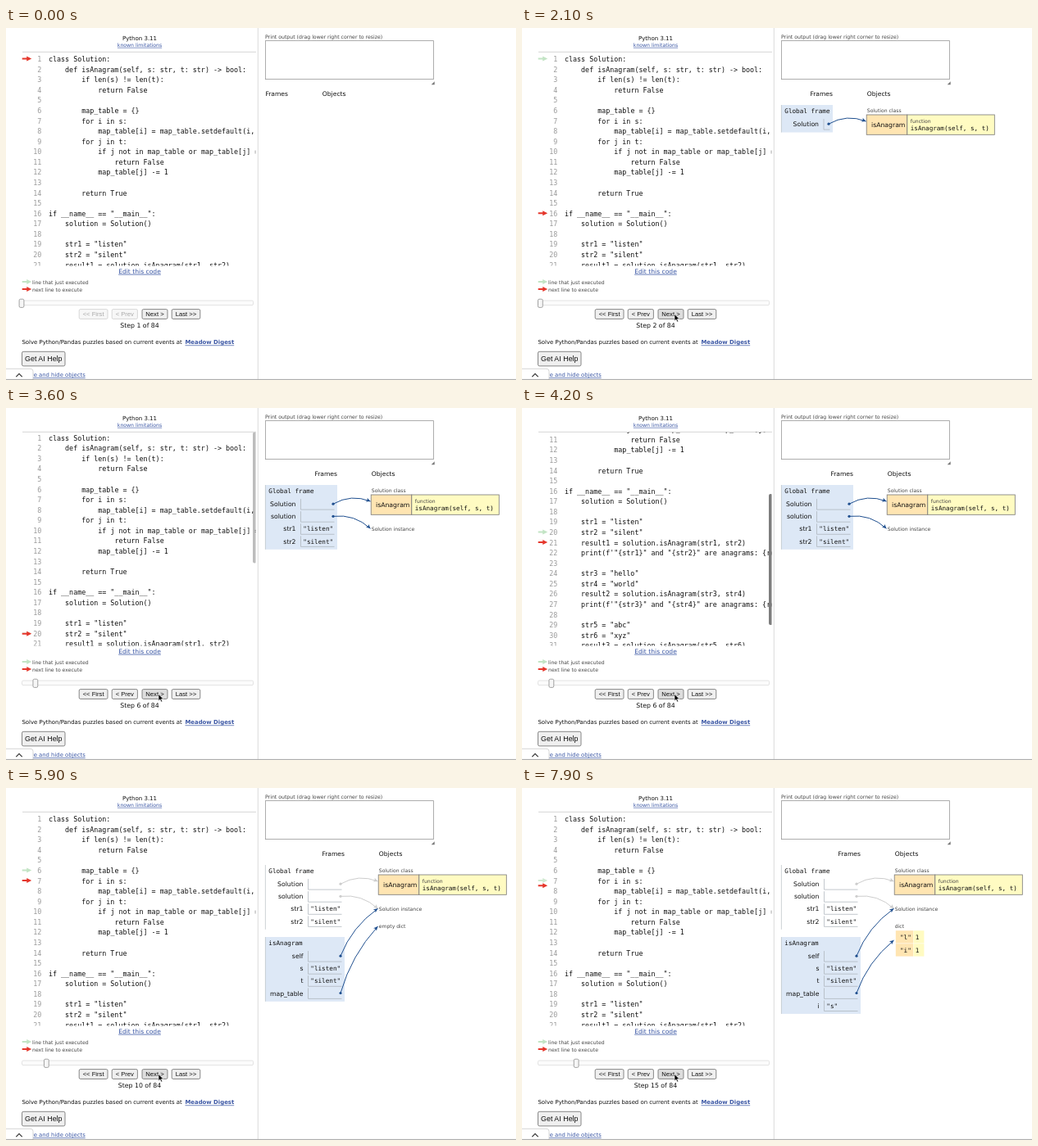
These frames come from a looping animation (622x430 px, 8 s). An HTML page:

```html
<!DOCTYPE html>
<html lang="en">
<head>
<meta charset="utf-8">
<title>Step through isAnagram</title>
<style>
  html, body { margin: 0; width: 100%; height: 100%; overflow: hidden; background: #fff; }
  svg { display: block; width: 622px; height: 430px; }
  text { font-family: "DejaVu Sans", sans-serif; fill: #111; white-space: pre; }
  .mono { font-family: "DejaVu Sans Mono", monospace; }
  .ui { font-family: "Liberation Sans", sans-serif; }
  .num { fill: #999; }
  .small { fill: #444; }
  .link { fill: #3a56a4; text-decoration: underline; }
  .bold { font-weight: bold; }
  .off { fill: #a9a9a9; }
</style>
</head>
<body>
<svg id="stage" viewBox="0 0 622 430">
  <defs>
    <clipPath id="view"><rect x="16" y="29" width="288.5" height="261.5"/></clipPath>
    <path id="arrow" d="M0-1H5.5V-3L11.5 0L5.5 3V1H0Z"/>
  </defs>
  <g id="page"></g>
  <g clip-path="url(#view)">
    <g id="code"></g>
    <rect id="thumb" x="301" width="4.4" height="160" rx="2" fill="#7d7d7d"/>
  </g>
  <path d="M20 29.3H305" stroke="#ccc" stroke-width=".8"/>
  <g id="controls"></g>
  <g id="heap"></g>
  <path id="mouse" d="M0 0V8.2L1.9 6.5L3.2 9.5L4.6 8.9L3.3 6H5.9Z" fill="#000" stroke="#fff" stroke-width=".6"/>
</svg>
<script>
const $ = id => document.getElementById(id);
const LOOP = 8000, GLIDE = 400, PITCH = 12.57, SCROLL = 125;
const RED = '#e5372c', GREEN = '#c3e4c5', BLUE = '#1f4f8f', PALE = '#cdcdcd';

// start time, line just executed, next line
const steps = [
  [0, 0, 1], [1500, 1, 16], [2150, 16, 17], [2700, 17, 19], [3100, 19, 20],
  [3500, 20, 21], [4300, 21, 2], [4700, 2, 3], [5100, 3, 6], [5500, 6, 7],
  [6000, 7, 8], [6400, 8, 7], [6850, 7, 8], [7300, 8, 7], [7700, 7, 8]
];

const trial = (n, a, b) => `
    str${2 * n - 1} = "${a}"
    str${2 * n} = "${b}"
    result${n} = solution.isAnagram(str${2 * n - 1}, str${2 * n})
    print(f'"{str${2 * n - 1}}" and "{str${2 * n}}" are anagrams: {result${n}}')
`;
const source = `class Solution:
    def isAnagram(self, s: str, t: str) -> bool:
        if len(s) != len(t):
            return False

        map_table = {}
        for i in s:
            map_table[i] = map_table.setdefault(i, 0) + 1
        for j in t:
            if j not in map_table or map_table[j] == 0:
                return False
            map_table[j] -= 1

        return True

if __name__ == "__main__":
    solution = Solution()
` + trial(1, 'listen', 'silent') + trial(2, 'hello', 'world') + trial(3, 'abc', 'xyz');

const clamp = v => Math.min(1, Math.max(0, v));
const cubic = p => p < .5 ? 4 * p ** 3 : 1 - 4 * (1 - p) ** 3;
const swing = p => .5 - Math.cos(p * Math.PI) / 2;
const span = (t, from, len) => clamp((t - from) / len);
const lineY = n => 37.6 + PITCH * (n - 1);

const esc = s => s.replace(/&/g, '&amp;').replace(/</g, '&lt;');
// y is the optical middle of the text
const text = (x, y, s, size, cls = '', anchor = 'start') =>
  `<text x="${x}" y="${y + size * .36}" font-size="${size}" class="${cls}" text-anchor="${anchor}">${esc(s)}</text>`;
const rect = (x, y, w, h, fill, stroke = 'none', r = 0) =>
  `<rect x="${x}" y="${y}" width="${w}" height="${h}" fill="${fill}" stroke="${stroke}" stroke-width=".8" rx="${r}"/>`;
const path = (d, stroke, w = .8, fill = 'none') =>
  `<path d="${d}" stroke="${stroke}" stroke-width="${w}" fill="${fill}"/>`;
const marker = (y, fill, id = '') =>
  `<use href="#arrow" ${id && `id="${id}"`} transform="translate(19.7 ${y})" fill="${fill}"/>`;

function drawPage() {
  $('page').innerHTML =
    text(163, 12.5, 'Python 3.11', 7, '', 'middle') +
    text(163, 20.6, 'known limitations', 6.15, 'link', 'middle') +
    text(163, 297, 'Edit this code', 7.6, 'link', 'middle') +
    marker(310, GREEN) + text(32, 310.3, 'line that just executed', 6.13, 'small') +
    marker(319, RED) + text(32, 319.5, 'next line to execute', 6.13, 'small') +
    text(19.5, 384, 'Solve Python/Pandas puzzles based on current events at', 6.9) +
    text(218.5, 384, 'Meadow Digest', 6.9, 'link bold') +
    rect(19.5, 395.3, 52.5, 17.6, '#efefef', '#6b6b6b', 1.8) +
    text(45.8, 404.2, 'Get AI Help', 8.9, 'ui', 'middle') +
    text(19.5, 423.5, 'Move and hide objects', 6.85, 'link') +
    path('M-1 416.3H30Q33 416.3 33 419.5V431H-1Z', '#ccc', .8, '#fff') +
    path('M12.3 426.2L16 422.4L19.7 426.2', '#333', 1.1) +
    path('M307.3 0V429', '#d2d2d2') + path('M0 429.4H622', '#8c8c8c') +
    text(316, 10.6, 'Print output (drag lower right corner to resize)', 6.2, 'small') +
    rect(316.4, 15.6, 205, 47, '#fff', '#999') +
    path('M522.7 65.3V69.3H518.7Z', 'none', 0, '#777');
}

function drawCode() {
  $('code').innerHTML = source.split('\n').map((line, i) => {
    const body = line.trimStart(), y = lineY(i + 1) + .6;
    return text(43.2, y, `${i + 1}`, 8.35, 'mono num', 'end') +
      text(52 + 5.027 * (line.length - body.length), y, body, 8.35, 'mono');
  }).join('') + marker(0, GREEN, 'prev') + marker(0, RED, 'next');
}

function button(x, w, label, on, hover) {
  const fill = hover ? '#dedede' : on ? '#efefef' : '#f7f7f7';
  return rect(x, 343.6, w, 11.8, fill, on ? '#6b6b6b' : '#cfcfcf', 1.6) +
    text(x + w / 2, 349.4, label, 7.65, on ? 'ui' : 'ui off', 'middle');
}

function drawControls(n, hover) {
  $('controls').innerHTML =
    rect(19.5, 333, 282, 5.6, '#fbfbfb', '#dcdcdc', 1.5) +
    rect(16.1 + 3.37 * (n - 1), 331.2, 5.8, 10.2, '#f6f6f6', '#8f8f8f', 1.6) +
    button(89.2, 34.8, '<< First', n > 1) + button(129.2, 31.2, '< Prev', n > 1) +
    button(166, 31, 'Next >', true, hover) + button(202.2, 34.6, 'Last >>', true) +
    text(163, 363.5, `Step ${n} of 84`, 7.8, '', 'middle');
}

// curved pointer bulging to the left of its direction
function pointer(x1, y1, x2, y2, color) {
  const len = Math.hypot(x2 - x1, y2 - y1);
  const cx = (x1 + x2) / 2 + (y2 - y1) / len * 11, cy = (y1 + y2) / 2 - (x2 - x1) / len * 11;
  const turn = Math.atan2(y2 - cy, x2 - cx) * 180 / Math.PI;
  return path(`M${x1} ${y1}Q${cx} ${cy} ${x2} ${y2}`, color, 1) +
    `<circle cx="${x1}" cy="${y1}" r="1.6" fill="${color}"/>` +
    `<path d="M0 0L-5.2-2.5L-4-0L-5.2 2.5Z" fill="${color}" transform="translate(${x2} ${y2}) rotate(${turn})"/>`;
}

// vars: [name, string value or pointer target y]
function frame(top, title, vars, right, cell, active) {
  const row = i => top + 23.5 + 15.1 * i, bottom = row(vars.length - 1) + 10;
  const left = right - 3.5 - cell, pointers = [];
  let out = active ? rect(316, top, right - 316, bottom - top, '#dde8f6') : '';
  out += path(`M316.4 ${top}V${bottom}`, '#c2c8cc') + text(320.3, top + 7.2, title, 7.65, 'mono');
  vars.forEach(([name, value], i) => {
    const y = row(i);
    out += text(left - 6, y, name, 7.73, '', 'end') +
      path(`M${left} ${y - 6.4}V${y + 6.6}H${right - 3.5}`, '#a9b0b8', .7);
    if (typeof value === 'string') out += text(left + 2.8, y, `"${value}"`, 7.65, 'mono');
    else pointers.push([right - 5, y - .3, right + 40.5, value, active ? BLUE : PALE]);
  });
  return [out, pointers];
}

function drawHeap(n) {
  const right = n < 2 ? 344 : n < 5 ? 379 : n < 10 ? 404 : 413;
  const x = right + 41.8, cell = n < 5 ? 7.5 : 41;
  const inCall = n > 6, dictY = n > 11 ? 186 : 169;
  let out = text(right, 80.3, 'Frames', 7.6, '', 'end') + text(x, 80.3, 'Objects', 7.6);
  if (n > 1) {
    const globals = [['Solution', 114], ['solution', 147.3], ['str1', 'listen'], ['str2', 'silent']];
    const count = n < 4 ? 1 : n < 5 ? 2 : n < 6 ? 3 : 4;
    const parts = [frame(94, 'Global frame', globals.slice(0, count), right, cell, !inCall)];
    if (inCall) {
      const locals = [['self', 147.3], ['s', 'listen'], ['t', 'silent']];
      if (n > 9) locals.push(['map_table', dictY]);
      if (n > 10) locals.push(['i', 'lis'[n - 11 >> 1]]);
      parts.push(frame(182, 'isAnagram', locals, right, cell, true));
    }
    out += parts.map(p => p[0]).join('') +
      text(x, 101.2, 'Solution class', 6.08, 'small') +
      rect(x - .6, 106, 49.6, 24.3, '#ffe5b2', '#777') +
      rect(x + 49, 106, 106.5, 24.3, '#fffbc2', '#777') +
      text(x + 5.2, 118.2, 'isAnagram', 7.73) +
      text(x + 53, 113.7, 'function', 6.08, 'small') +
      text(x + 53, 122.6, 'isAnagram(self, s, t)', 7.6, 'mono');
    if (n > 3) out += text(x, 147.5, 'Solution instance', 6.08, 'small');
    if (n > 9) out += text(x, 168.8, n > 11 ? 'dict' : 'empty dict', 6.08, 'small');
    if (n > 11) ['l', 'i'].slice(0, n > 13 ? 2 : 1).forEach((key, i) => {
      const y = 174.2 + 16 * i;
      out += rect(x + 1, y, 21.3, 15.4, '#ffe5b2') + rect(x + 22.6, y, 13, 15.4, '#fffbc2') +
        text(x + 6.2, y + 8, `"${key}"`, 7.65, 'mono') + text(x + 25, y + 8, '1', 7.65);
    });
    out += parts.flatMap(p => p[1]).map(p => pointer(...p)).join('');
  }
  $('heap').innerHTML = out;
}

let shown = '';
function render(t) {
  let n = steps.length;
  while (steps[n - 1][0] > t) n--;
  const hover = t >= 1050, key = n + '/' + hover;
  if (key !== shown) {
    shown = key;
    drawControls(n, hover);
    drawHeap(n);
  }

  const [start, done, next] = steps[n - 1];
  const from = lineY(n > 1 ? steps[n - 2][2] : next);
  const y = from + (lineY(next) - from) * cubic(span(t, start, GLIDE));
  $('next').setAttribute('transform', `translate(19.7 ${y})`);
  $('prev').setAttribute('transform', `translate(19.7 ${lineY(done || 1)})`);
  $('prev').setAttribute('opacity', done ? span(t, start, 250) : 0);

  const scroll = SCROLL * (swing(span(t, 3570, 430)) - swing(span(t, 4290, 300)));
  $('code').setAttribute('transform', `translate(0 ${-scroll})`);
  $('thumb').setAttribute('y', 28.5 + scroll * .612);
  $('thumb').setAttribute('opacity', span(t, 3570, 60) - span(t, 5000, 250));

  const p = 1 - (1 - span(t, 480, 620)) ** 2;
  $('mouse').setAttribute('transform', `translate(${256 - 70 * p} ${318 + 31.5 * p})`);
  $('mouse').setAttribute('opacity', t < 500 ? 0 : 1);
}

drawPage();
drawCode();
render(0);
let origin;
requestAnimationFrame(function tick(now) {
  origin ??= now;
  render((now - origin) % LOOP);
  requestAnimationFrame(tick);
});
</script>
</body>
</html>
```
